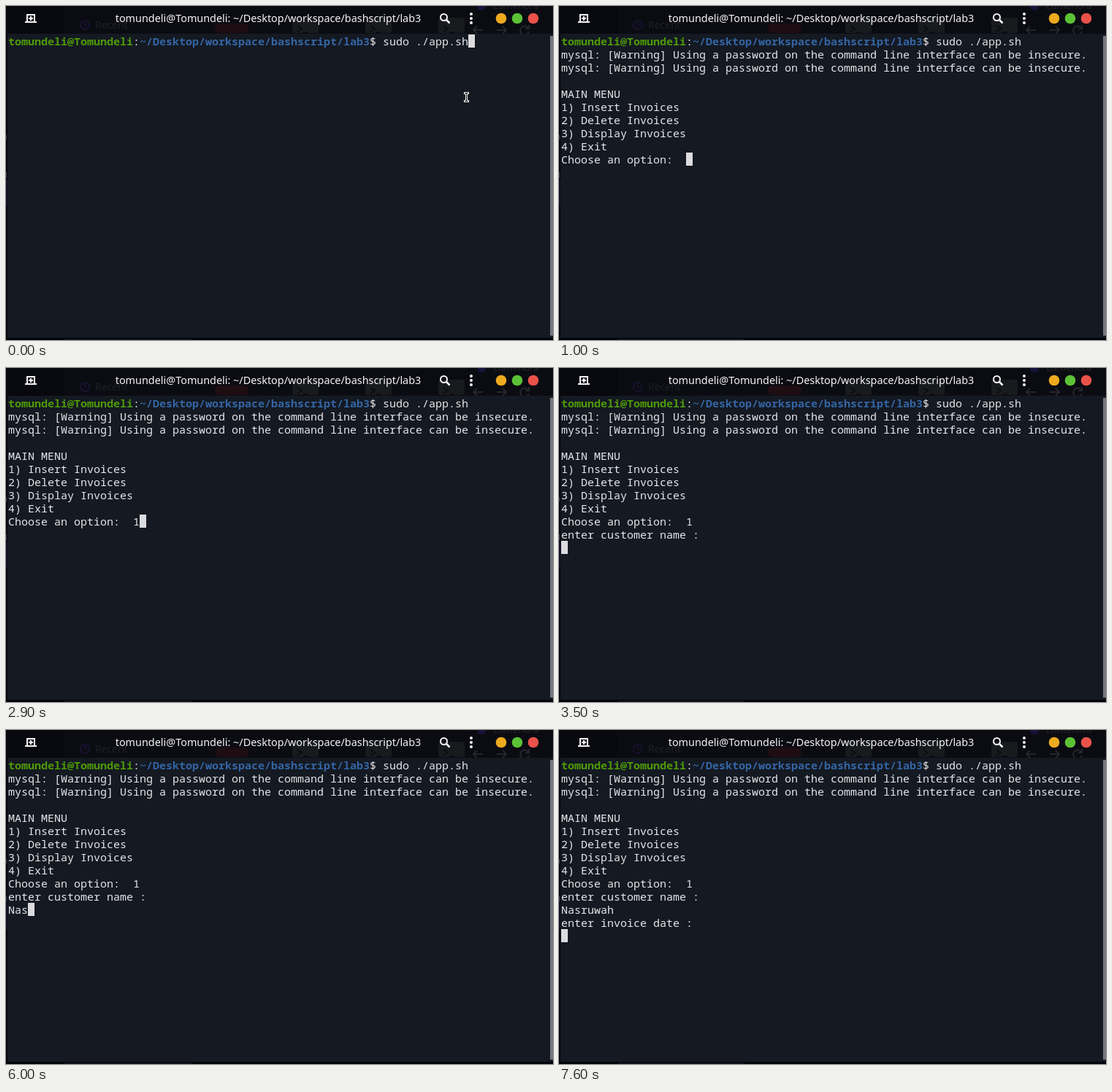
An HTML page for the animation above (8000 ms loop, 749 by 458 pixels).

```html
<!DOCTYPE html>
<html lang="en">
<head>
<meta charset="utf-8">
<title>Terminal session</title>
<style>
  html, body { margin: 0; width: 100%; height: 100%; overflow: hidden; background: #07080d; }
  svg, pre, #cursor { position: absolute; }
  svg { left: 0; top: 0; }
  svg text { font-family: "Noto Sans", sans-serif; }
  pre { left: 3px; top: 39px; margin: 0; font: 15px/18px "Noto Sans Mono", monospace; color: #e6e6e8; }
  pre b { color: #4e9a06; }
  pre .path { color: #3465a4; }
  #cursor { width: 9px; height: 18px; background: #dcdce0; }
</style>
</head>
<body>
<svg width="749" height="458" viewBox="0 0 749 458">
  <!-- desktop showing through the window frame -->
  <rect width="749" height="38" fill="#0b0c12"/>
  <rect width="80" height="38" fill="#08090e"/>
  <g fill="none" stroke="#171231" stroke-width="2">
    <circle cx="108" cy="26" r="6"/>
    <path d="M108 22v4h3" stroke-width="1.5"/>
  </g>
  <text x="122" y="31" font-size="14" fill="#1f2026">Recent</text>
  <rect x="286" y="24" width="46" height="13" rx="6" fill="#1e0d13"/>
  <g id="folders"></g>
  <circle cx="651" cy="0" r="6" fill="#17133a"/>
  <text x="667" y="4" font-size="13" fill="#24252b">Lumenora</text>
  <path d="M653 33h-13m5-5l-5 5l5 5M672 33h13m-5-5l5 5l-5 5M715 30a6 6 0 1 0 1 5M716 26v5h-5" fill="none" stroke="#25262c" stroke-width="2"/>
  <rect y="455" width="749" height="3" fill="#030408"/>
  <rect x="80" y="456" width="174" height="2" fill="#111217"/>
  <rect y="38" width="2" height="417" fill="#05060a"/>
  <rect y="238" width="2" height="36" fill="#170c29"/>
  <path d="M0 177h1v6h-1zM0 228h1v8h-1z" fill="#344059"/>
  <rect x="2" y="38" width="747" height="417" fill="#141922"/>
  <rect x="745" y="41" width="4" height="411" fill="#75777c"/>

  <!-- title bar -->
  <text x="359" y="22" font-size="14.4" text-anchor="middle" fill="#f5f5f6">tomundeli@Tomundeli: ~/Desktop/workspace/bashscript/lab3</text>
  <g fill="none" stroke="#f5f5f6" stroke-width="2">
    <path d="M26 22h16M29 22v-10h10v10M31 17h6M34 14v6"/>
    <circle cx="599.5" cy="15.5" r="4.5"/>
    <path d="M602.5 18.5l5 5" stroke-width="2.5"/>
  </g>
  <g fill="#f5f5f6">
    <circle cx="637" cy="11" r="2"/><circle cx="637" cy="17" r="2"/><circle cx="637" cy="23" r="2"/>
  </g>
  <circle cx="678" cy="17" r="7.3" fill="#eeaa1e"/>
  <circle cx="700" cy="17" r="7.3" fill="#5bc236"/>
  <circle cx="722" cy="17" r="7.3" fill="#e9524a"/>

  <g id="pointer" fill="none" stroke-linecap="square">
    <path id="beam" d="M628.5 119.5h4M628.5 130.5h4M630.5 119.5v11" stroke="#fff" stroke-width="3"/>
    <path d="M628.5 119.5h4M628.5 130.5h4M630.5 119.5v11" stroke="#08090c" stroke-width="1"/>
  </g>
</svg>
<pre><b>tomundeli@Tomundeli</b>:<b class="path">~/Desktop/workspace/bashscript/lab3</b><span id="output"></span></pre>
<div id="cursor"></div>
<script>
const LOOP = 8000, PROMPT_COLUMNS = 55, CELL = 9, LINE = 18;
const byId = id => document.getElementById(id);
const output = byId("output"), cursor = byId("cursor"), pointer = byId("pointer");

byId("folders").innerHTML = [392, 492, 592].map(x =>
  `<rect x="${x}" y="16" width="36" height="21" rx="2" fill="#191a1e"/>
   <path d="M${x + 7} 27l6 4l-6 4M${x + 15} 36h7" fill="none" stroke="#0c0d11" stroke-width="2"/>`).join("");

const warning = "mysql: [Warning] Using a password on the command line interface can be insecure.\n";
const menu = `
${warning}${warning}
MAIN MENU
1) Insert Invoices
2) Delete Invoices
3) Display Invoices
4) Exit
Choose an option:  `;

// [time, printed text, cursor visible]
const keyTimes = [5500, 5700, 6000, 6300, 6400, 6500, 6700, 7000];
const steps = [
  [0, "$ sudo ./app.sh", true], [300, "", false], [900, "", true],
  [1000, menu, true], [1500, "", false], [2100, "", true], [2700, "", false],
  [2900, "1", true], [3300, "", false], [3400, "\n", true],
  [3500, "enter customer name :\n", true], [4400, "", false], [4600, "", true],
  ...[..."Nasruwah"].map((letter, i) => [keyTimes[i], letter, true]),
  [7300, "", false], [7600, "\nenter invoice date :\n", true]
];

function render(time) {
  const done = steps.filter(([start]) => start <= time);
  const text = done.map(([, printed]) => printed).join("");
  if (output.textContent !== text) output.textContent = text;

  const lines = text.split("\n"), row = lines.length - 1;
  const column = lines[row].length + (row ? 0 : PROMPT_COLUMNS);
  cursor.style.left = 3 + column * CELL + "px";
  cursor.style.top = 39 + row * LINE + "px";
  cursor.style.visibility = done[done.length - 1][2] ? "visible" : "hidden";
  pointer.style.visibility = time < 900 ? "visible" : "hidden";
}

const began = performance.now();
function tick() {
  render((performance.now() - began) % LOOP);
  requestAnimationFrame(tick);
}
tick();
</script>
</body>
</html>
```
